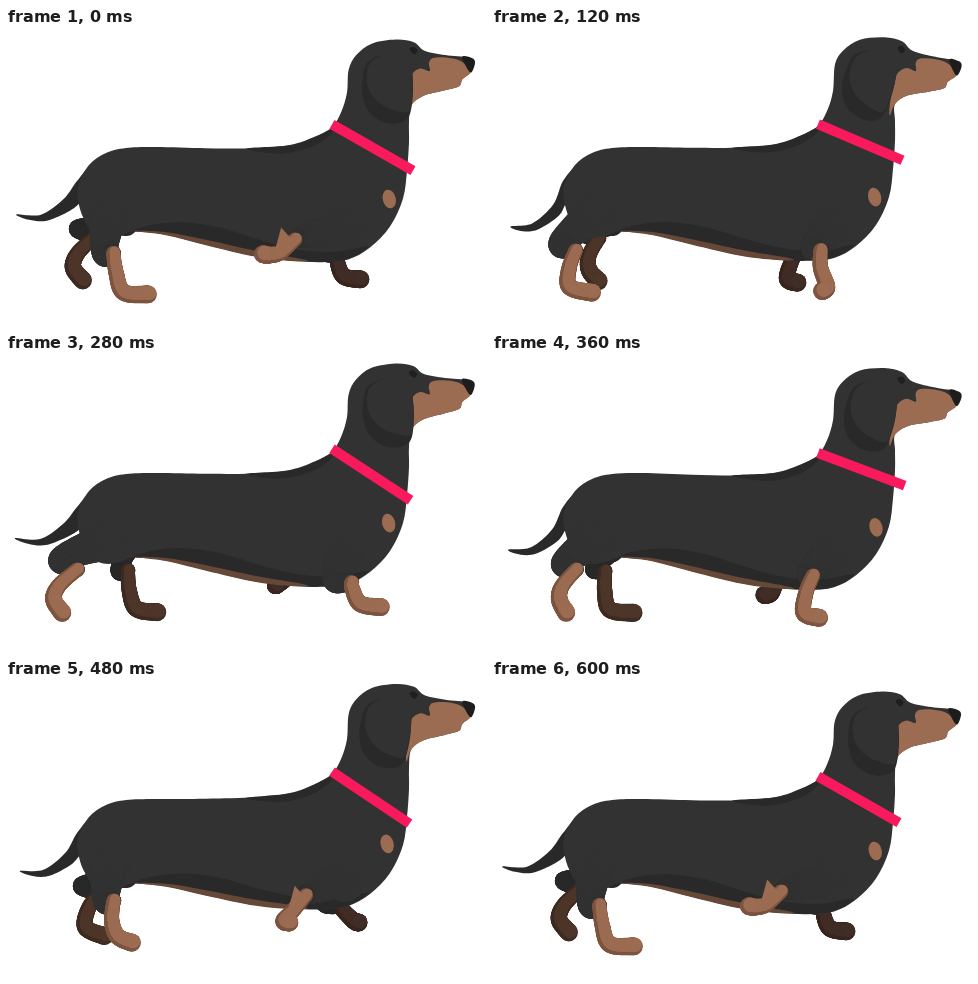
Recreate the animation shown at these times as an HTML page with a canvas. Size 480 by 298 pixels, loop 0.64 s.

```html
<!DOCTYPE html>
<html>
<head>
<meta charset="utf-8">
<title>Walking dachshund</title>
<style>
html, body { margin: 0; width: 100%; height: 100%; overflow: hidden; background: #fff; }
canvas { display: block; }
</style>
</head>
<body>
<canvas id="stage" width="480" height="298"></canvas>
<script>
const ctx = document.getElementById('stage').getContext('2d');
const COAT = '#323232', SHADE = '#292929', TAN = '#9b6c52';
const NEAR_SKIN = [TAN, '#7d543f'], HIND_SKIN = ['#4d3629', '#3e2b21'], FRONT_SKIN = ['#412d27', '#38261f'];
const STEP = 40, LOOP = 640, CYCLE = 15, RAD = Math.PI / 180;

const wave = (phase, mean, size, lag) => mean + size * Math.cos(phase - lag * RAD);

// A joint circles around (x, y): swing and dip are sizes, each with a lag in degrees
const joint = (x, y, swing, lag, dip, dipLag, rate = 1) => (phase, reach) => [
  wave(phase, x, swing * reach, lag),
  wave(phase * rate, y, dip * reach, dipLag)
];
const HIND = [
  joint(78, 215.5, 26, -39, 10, -17),
  joint(90.5, 220, 21, -37, 5, 12),
  joint(83, 238, 31, -29, 7, 0),
  joint(84, 254.5, 38, -28, 10, 8),
  joint(100, 262.5, 44, -18, 4, 15)
];
const FRONT = [
  joint(318, 219, 18, 175, 11, 180),
  joint(324, 221.5, 35, 175, 10, 180),
  joint(320, 232, 46, 172, 8, 160, 2),
  joint(322, 243, 59, 170, 17, 160, 2),
  joint(327, 245, 70, 180, 20, 160, 2)
];
const steady = a => a;
const quickSwing = a => a + .52 * (1 - Math.cos(a));

const pairs = list => list.reduce((out, v, i) => {
  if (i % 2) out[out.length - 1].push(v); else out.push([v]);
  return out;
}, []);

function blob(pts, color) {
  const n = pts.length, at = i => pts[(i + n) % n];
  ctx.beginPath();
  ctx.moveTo(...pts[0]);
  for (let i = 0; i < n; i++) {
    const [a, b, c, d] = [at(i - 1), at(i), at(i + 1), at(i + 2)];
    ctx.bezierCurveTo(b[0] + (c[0] - a[0]) / 6, b[1] + (c[1] - a[1]) / 6,
      c[0] - (d[0] - b[0]) / 6, c[1] - (d[1] - b[1]) / 6, c[0], c[1]);
  }
  ctx.fillStyle = color;
  ctx.fill();
}

function turn(pts, cx, cy, deg, dx = 0, dy = 0) {
  const c = Math.cos(deg * RAD), s = Math.sin(deg * RAD);
  return pts.map(([x, y]) => [
    cx + dx + (x - cx) * c - (y - cy) * s,
    cy + dy + (x - cx) * s + (y - cy) * c
  ]);
}

// Point at u (0 to 1) on a smooth line through pts
function along(pts, u) {
  const last = pts.length - 1, i = Math.min(last - 1, Math.floor(u * last)), f = u * last - i;
  const at = k => pts[Math.max(0, Math.min(last, k))];
  return [0, 1].map(j => {
    const [a, b, c, d] = [at(i - 1)[j], at(i)[j], at(i + 1)[j], at(i + 2)[j]];
    return b + f / 2 * (c - a + f * (2 * a - 5 * b + 4 * c - d + f * (3 * (b - c) + d - a)));
  });
}

// Rounded limb whose radius follows a function of u
function limb(pts, radius, color, dx = 0, dy = 0) {
  ctx.fillStyle = color;
  for (let u = 0; u <= 1; u += 1 / 64) {
    const [x, y] = along(pts, u);
    ctx.beginPath();
    ctx.arc(x + dx, y + dy, radius(u), 0, 7);
    ctx.fill();
  }
}

function leg(joints, phase, reach, dx, dy, [hx, hy, hr], coat, [skin, edge]) {
  const pts = joints.map(at => at(phase, reach)).map(([x, y]) => [x + dx, y + dy]);
  const shin = pts.slice(1), girth = u => 7 + 2 * u;
  limb([[hx, hy], pts[0], pts[1]], u => hr + (7.5 - hr) * u ** .5, coat);
  limb(shin, girth, edge);
  limb(shin, u => girth(u) - 2, skin, 1.4, -1.4);
  return shin;
}

function draw(step) {
  const walk = step / CYCLE * 2 * Math.PI;
  const bob = (mean, size, lag) => wave(2 * walk, mean, size, lag);
  const sink = bob(.5, 3.8, 60);
  const sway = list => pairs(list).map(([x, y]) =>
    [x, y + sink * Math.max(0, Math.min(1, (x - 150) / 180))]);
  const nod = pts => turn(pts, 385, 45, bob(3.5, 3.5, 110), -1.5, bob(-1.5, 5, 55));
  const head = list => nod(pairs(list));
  const flap = list => nod(turn(pairs(list), 385, 35, bob(3, 6, 140)));

  ctx.fillStyle = '#fff';
  ctx.fillRect(0, 0, 480, 298);

  const away = walk + Math.PI - .2;
  leg(HIND, steady(away), .85, 14, -7, [120, 196, 12], SHADE, HIND_SKIN);
  leg(FRONT, quickSwing(away), .75, -8, 0, [315, 212, 12], SHADE, FRONT_SKIN);

  // Tail follows its tip, less and less towards the root
  const tx = bob(4.5, 5, 130), ty = bob(7, 8, 125);
  const tail = (x, y, pull) => [x + tx * pull, y + ty * pull];
  blob([tail(9, 184, 1), tail(34, 185, .7), tail(57, 170, .45), [71, 153], [84, 140], [90, 160],
    [75, 174], tail(63, 182, .4), tail(40, 191, .7), tail(22, 189.5, .95)], SHADE);

  // Whole silhouette
  blob([
    ...sway([72, 158, 83, 137, 100, 125, 120, 120, 150, 119, 200, 119.5, 250, 119,
      285, 115, 308, 107, 325, 98, 335, 82, 341, 62]),
    ...head([344, 42, 351, 27, 366, 15, 390, 10, 408, 12, 419, 20, 440, 23.5,
      463, 25, 468, 28, 466, 39, 458, 47, 455, 54, 440, 59, 420, 65, 408, 75]),
    ...sway([403, 92, 403, 112, 401, 140, 397, 168, 384, 196, 364, 217, 342, 229, 316, 232,
      288, 231, 250, 227, 200, 216, 160, 206.5, 130, 203, 112, 208, 95, 206, 80, 194, 73, 177])
  ], COAT);

  // Shading along the back and belly
  blob(sway([240, 119.5, 285, 115.5, 308, 107.5, 325, 99, 323, 106, 305, 117, 275, 124]), SHADE);
  blob(sway([128, 203, 150, 196, 180, 194, 215, 199, 255, 211, 295, 220, 330, 221, 362, 216,
    342, 228.5, 316, 231.5, 288, 230.5, 250, 226, 200, 215.5, 160, 206]), SHADE);
  blob(sway([128, 203, 160, 204, 200, 211, 250, 221.5, 300, 230, 288, 231.5,
    250, 227.5, 200, 216.5, 160, 207]), '#664838');

  // Face
  blob(head([405, 50, 409, 42, 416, 38, 425, 40, 424, 32, 428, 27, 442, 26, 456, 29,
    466, 39, 458, 47, 455, 54, 440, 59, 420, 65, 408, 75, 404, 87, 403, 72]), TAN);
  blob(head([457, 24.5, 467, 25.5, 470, 30, 467, 39.5, 463, 37]), '#1d1d1d');
  blob(head([404, 19, 408, 16.5, 412, 20, 409, 24]), '#1f1f1f');

  blob(flap([364, 32, 358, 48, 358, 66, 364, 82, 377, 92, 392, 94, 404, 88, 408, 70,
    408, 50, 404, 28, 385, 24]), SHADE);
  blob(flap([367, 32, 362, 44, 364, 60, 374, 73, 388, 80, 404, 82, 407.5, 66,
    408, 48, 404, 27, 385, 23]), COAT);

  // Collar and chest spot
  ctx.beginPath();
  ctx.moveTo(326, bob(95, 4, 70));
  ctx.lineTo(bob(407, 6, 90), bob(140, -10, 105));
  ctx.lineWidth = 10;
  ctx.strokeStyle = '#f9195d';
  ctx.stroke();

  ctx.beginPath();
  ctx.ellipse(bob(382.5, 1.5, 60), bob(168.5, 5, 60), 6.5, 9.5, -.25, 0, 7);
  ctx.fillStyle = TAN;
  ctx.fill();

  leg(HIND, steady(walk), 1, 0, 0, [102, 186, 24], COAT, NEAR_SKIN);
  const [top, low] = leg(FRONT, quickSwing(walk), 1, 0, 0, [338, 200, 22], COAT, NEAR_SKIN);

  // Elbow fold, visible while the leg is tucked up
  const fold = Math.max(0, Math.min(1, (220 - top[1]) / 6));
  ctx.beginPath();
  ctx.moveTo(top[0] - 14 * fold, top[1] - 12 * fold);
  ctx.lineTo(top[0] - 5 * fold, top[1] - 2 * fold);
  ctx.lineTo(...low);
  ctx.lineTo(low[0] - 5 * fold, low[1] - 4 * fold);
  ctx.fillStyle = TAN;
  ctx.fill();
}

const start = performance.now();
function tick() {
  const t = (performance.now() - start) % LOOP;
  draw(Math.floor(t / STEP) % CYCLE);
  requestAnimationFrame(tick);
}
tick();
</script>
</body>
</html>
```
